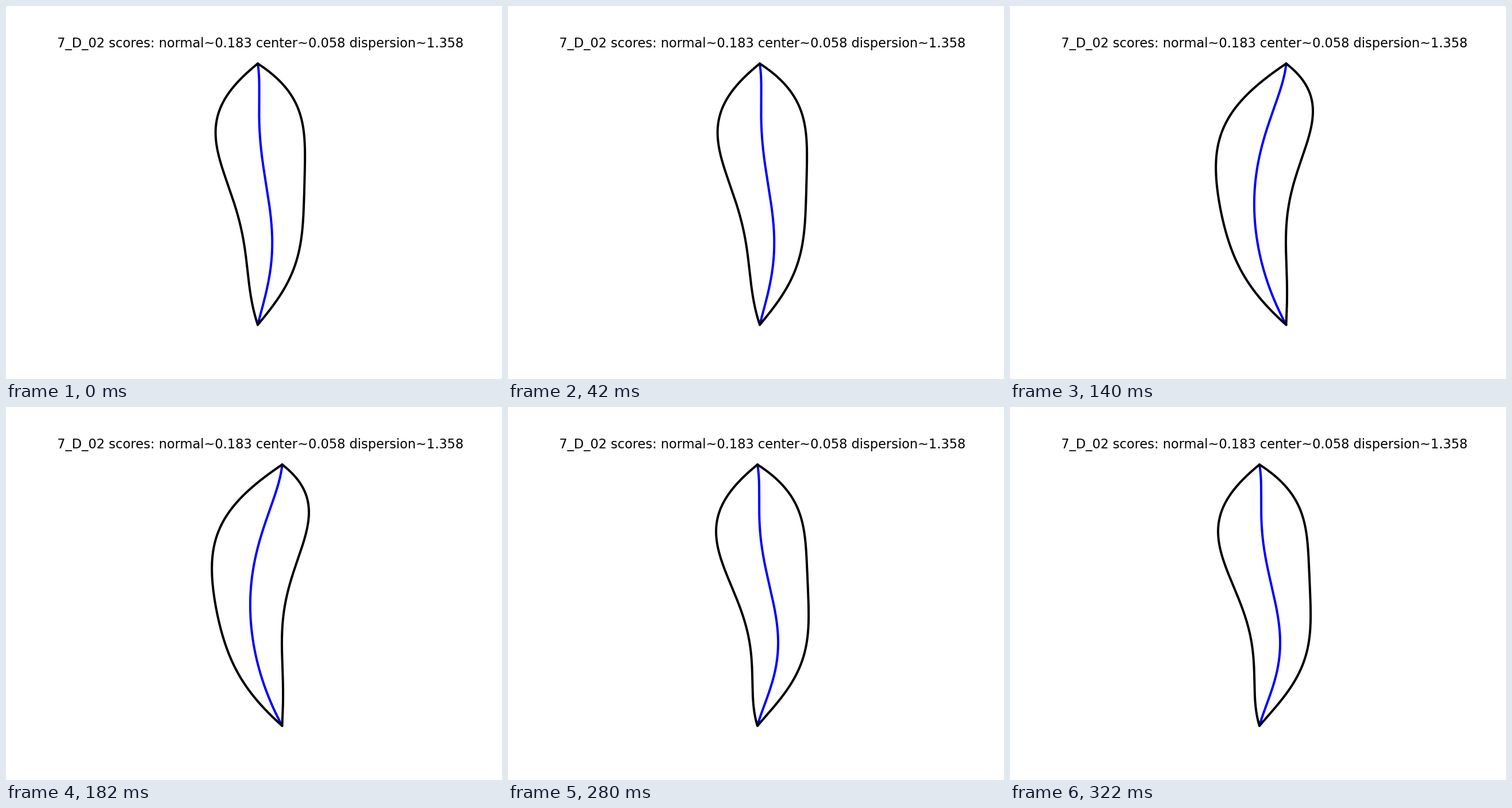
A matplotlib script for the animation above (350 ms loop, 863 by 649 pixels).

```python
import numpy as np
import matplotlib.pyplot as plt
from matplotlib.animation import FuncAnimation

W, H, DPI = 863, 649, 72
TOP, BOTTOM = 100.2, 554.8
TITLE = "7_D_02 scores: normal~0.183 center~0.058 dispersion~1.358"

# Everything is a smooth polynomial along the leaf, s = -1 (top) to 1 (bottom),
# pinned to zero at both tips and guided by five points in between.
s = np.linspace(-1, 1, 300)
y = TOP + (BOTTOM - TOP) * (s + 1) / 2
nodes = -np.cos(np.pi * np.arange(7) / 6)


def curve(*offsets):
    return np.polyval(np.polyfit(nodes, [0, *offsets, 0], 6), s)


# The half width is fixed; only the spine bends.
half = curve(35.8, 76.3, 63.5, 44, 16.3)
spines = [
    438 + curve(2.5, 3.1, 17.3, 24, 8),
    475 + curve(-7.2, -31.2, -31.5, -4.6, 3.8),
    480.5 + curve(-5.8, -33.5, -55.2, -43.9, -15.1),
    434.6 + curve(3.2, 7.1, 8.6, -3.4, -9.1),
    434 + curve(2.8, 4.4, 24.8, 33.9, 10),
]

# The small margin keeps the pixel size from rounding down.
fig = plt.figure(figsize=((W + 0.01) / DPI, (H + 0.01) / DPI), dpi=DPI,
                 facecolor="white")
ax = fig.add_axes([0, 0, 1, 1])
ax.set_xlim(0, W)
ax.set_ylim(H, 0)
ax.axis("off")

ax.text(443, 72, TITLE, family="DejaVu Sans", size=22.55, ha="center",
        va="baseline", color="black")
style = dict(lw=4, solid_joinstyle="round", solid_capstyle="round")
spine, = ax.plot([], [], color="blue", **style)
edge, = ax.plot([], [], color="black", **style)


def draw(i):
    mid = spines[i]
    spine.set_data(mid, y)
    edge.set_data(np.r_[mid - half, (mid + half)[::-1]], np.r_[y, y[::-1]])
    return spine, edge


anim = FuncAnimation(fig, draw, frames=len(spines), interval=70, repeat=True,
                     repeat_delay=0)
plt.show()
```
